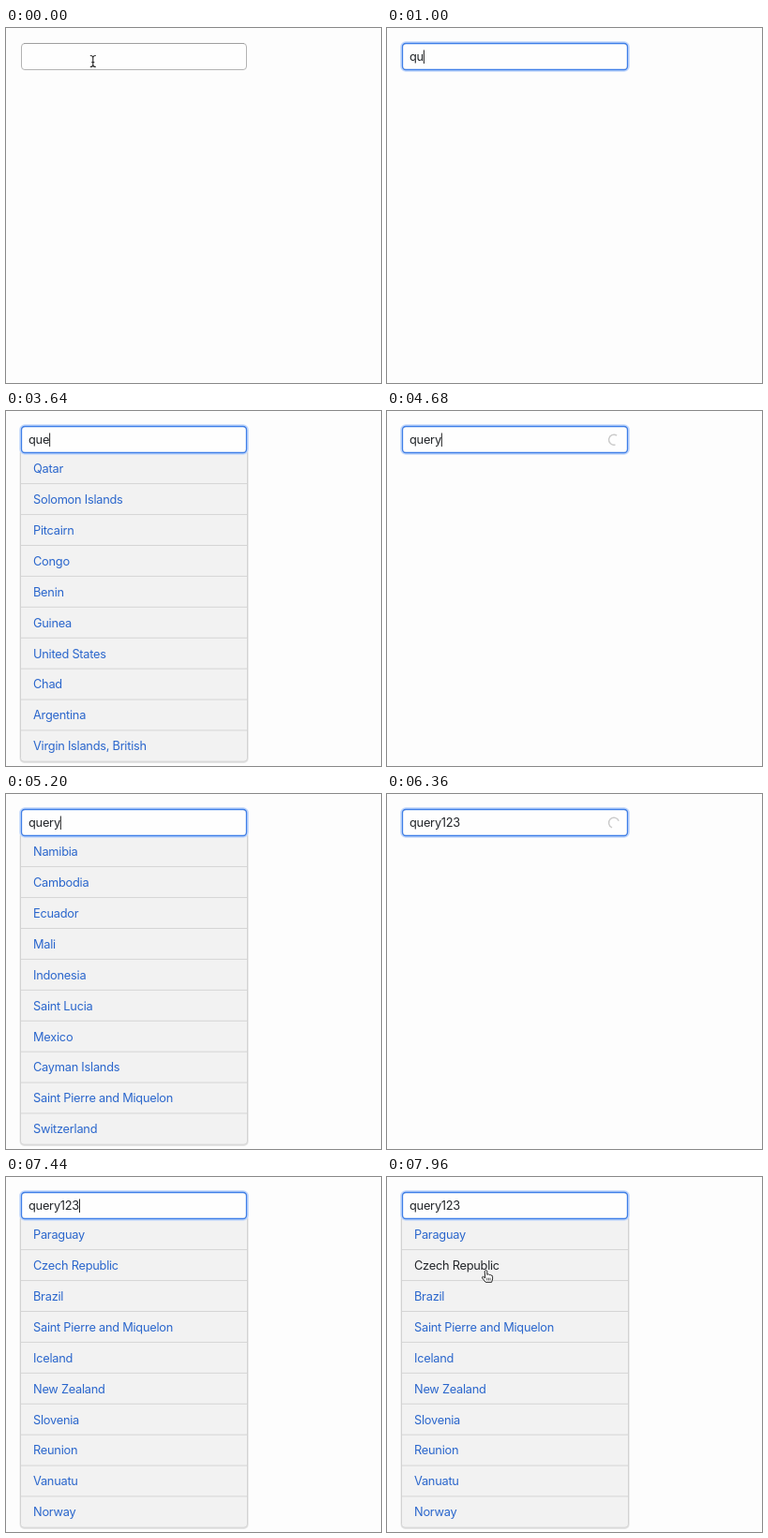
An HTML page that plays this animation: 400x379 px, repeating every 8 s.

```html
<!DOCTYPE html>
<html lang="en">
<head>
<meta charset="utf-8">
<title>Autocomplete field</title>
<style>
  html, body { margin: 0; width: 100%; height: 100%; overflow: hidden; background: #fdfdfd; }
  svg { display: block; width: 100%; height: 100%; }
  text { font: 12.8px Inter, "Open Sans", sans-serif; letter-spacing: -.25px; fill: #2a66cc; white-space: pre; }
  .dark { fill: #222529; }
</style>
</head>
<body>
<svg viewBox="0 0 400 379">
  <rect width="400" height="379" fill="#fdfdfd"/>
  <g id="list">
    <rect x="15.5" y="41" width="242.2" height="334" rx="4" fill="none" stroke="#e6e6e6" stroke-width="2"/>
    <rect x="15.5" y="41" width="242" height="333.2" rx="3.5" fill="#f2f2f2" stroke="#d2d2d2"/>
    <g id="rows"></g>
  </g>
  <rect x="16.5" y="16.5" width="240" height="28" rx="3.5" fill="#fefefe" stroke="#b3b3b3"/>
  <path d="M19 16.5H254" stroke="#9f9f9f"/>
  <g id="focus" fill="none">
    <rect x="15.5" y="15.5" width="242" height="30" rx="4.5" stroke="#c3d8fb" stroke-width="2.6"/>
    <rect x="16.5" y="16.5" width="240" height="28" rx="3.5" stroke="#3f7fe8" stroke-width="1.3"/>
  </g>
  <text id="typed" class="dark" x="24" y="35.4"></text>
  <path id="caret" d="M0 23.5V38" stroke="#222" stroke-width="1"/>
  <path id="spinner" d="M-1.9 -5.2A5.5 5.5 0 1 0 5.2 1.9" fill="none" stroke="#cacaca" stroke-width="1.4"/>
  <path id="beam" d="M89.8 29.5Q92.8 29.5 92.8 31.5Q92.8 29.5 95.8 29.5M92.8 31V40M89.8 41.5Q92.8 41.5 92.8 39.5Q92.8 41.5 95.8 41.5M91.3 36.5H94.3" fill="none" stroke="#222" stroke-width="1.1"/>
  <g id="hand" stroke="#222" stroke-linejoin="round" stroke-linecap="round">
    <path d="M-1.2 1Q0 -.7 1.2 1V5L2 4.6Q3.1 4.2 3.6 5.2Q4.9 4.6 5.4 5.8Q6.9 5.4 7 7V9.6L6 13H-.4L-3.9 8.7Q-4.4 7 -3 7L-1.2 8.4Z" fill="#fff"/>
    <path d="M1.1 8.8V10.8M2.8 8.8V10.8M4.5 8.8V10.8" stroke-width=".7"/>
  </g>
</svg>
<script>
const LOOP = 8000, TOP = 45, ROW = 32.92;
const $ = id => document.getElementById(id);
const [list, rows, focus, typed, caret, spinner, beam, hand] =
  ["list", "rows", "focus", "typed", "caret", "spinner", "beam", "hand"].map($);

const keys = [[760, "q"], [960, "u"], [2600, "e"], [4040, "r"], [4400, "y"], [5560, "1"], [5720, "2"], [5880, "3"]];
const caretOff = [[0, 180], [1520, 1960], [2360, 2600], [3120, 3560], [3920, 4040],
  [4800, 5160], [6320, 6640], [6900, 7240], [7720, LOOP]];
const requests = [
  { start: 1520, done: 2140, names: "Tonga|Yemen|Swaziland|Vanuatu|Benin|Syrian Arab Republic|Seychelles|Korea, Republic of|Nicaragua|Haiti" },
  { start: 2960, done: 3560, names: "Qatar|Solomon Islands|Pitcairn|Congo|Benin|Guinea|United States|Chad|Argentina|Virgin Islands, British" },
  { start: 4680, done: 5180, names: "Namibia|Cambodia|Ecuador|Mali|Indonesia|Saint Lucia|Mexico|Cayman Islands|Saint Pierre and Miquelon|Switzerland" },
  { start: 6160, done: 7400, names: "Paraguay|Czech Republic|Brazil|Saint Pierre and Miquelon|Iceland|New Zealand|Slovenia|Reunion|Vanuatu|Norway" }
];
const pointerPath = [[7640, 240, 360], [7800, 176, 306], [7960, 105.6, 99.3]];

function add(name, attrs) {
  const node = document.createElementNS("http://www.w3.org/2000/svg", name);
  for (const key in attrs) node.setAttribute(key, attrs[key]);
  return rows.appendChild(node);
}

const labels = Array.from({ length: 10 }, (_, i) => {
  if (i) add("path", { d: `M16 ${TOP + ROW * i - .3}H257`, stroke: "#d5d5d5" });
  return add("text", { x: 29, y: 66 + ROW * i });
});

const show = (node, on) => node.setAttribute("visibility", on ? "visible" : "hidden");
const setText = (node, value) => { if (node.textContent !== value) node.textContent = value; };

function pointerAt(t) {
  if (t < pointerPath[0][0]) return null;
  const end = pointerPath.findIndex(p => p[0] > t);
  if (end < 0) return pointerPath.at(-1).slice(1);
  const [t0, x0, y0] = pointerPath[end - 1], [t1, x1, y1] = pointerPath[end];
  const k = (t - t0) / (t1 - t0);
  return [x0 + (x1 - x0) * k, y0 + (y1 - y0) * k];
}

function render(t) {
  focus.setAttribute("opacity", Math.min(1, Math.max(0, (t - 90) / 150)));
  show(beam, t < 740);

  setText(typed, keys.filter(k => k[0] <= t).map(k => k[1]).join(""));
  const width = typed.textContent ? typed.getComputedTextLength() : 0;
  caret.setAttribute("transform", `translate(${24.5 + width})`);
  show(caret, !caretOff.some(([from, to]) => t >= from && t < to));

  const request = requests.findLast(r => r.start <= t);
  const loaded = !!request && t >= request.done;
  show(spinner, request && !loaded);
  spinner.setAttribute("transform", `translate(242 30.7) rotate(${(t - 6960) / 800 * 360})`);
  show(list, loaded);

  const pointer = pointerAt(t);
  show(hand, pointer);
  if (pointer) hand.setAttribute("transform", `translate(${pointer})`);
  if (loaded) {
    const hovered = pointer ? Math.floor((pointer[1] - TOP) / ROW) : -1;
    request.names.split("|").forEach((name, i) => {
      setText(labels[i], name);
      labels[i].classList.toggle("dark", i === hovered);
    });
  }
}

const start = performance.now();
function frame() {
  render((performance.now() - start) % LOOP);
  requestAnimationFrame(frame);
}
frame();
</script>
</body>
</html>
```
